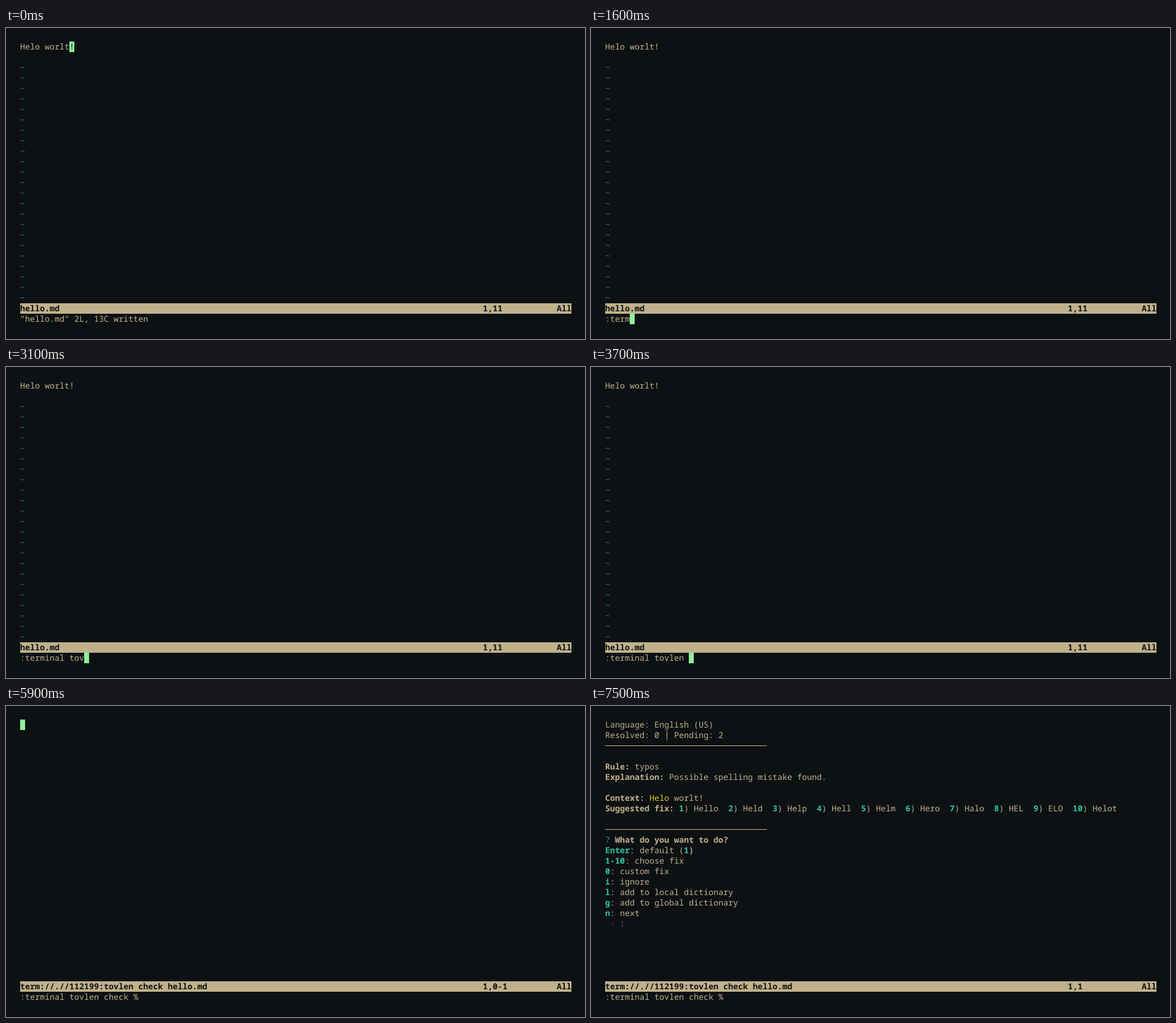
An HTML page for the animation above (8000 ms loop, 941x505 px).

```html
<!DOCTYPE html>
<html lang="en">
<head>
<meta charset="utf-8">
<title>Terminal session</title>
<style>
  html, body { margin: 0; width: 100%; height: 100%; overflow: hidden; background: #0d1113; }
  svg { display: block; width: 941px; height: 505px; }
  text {
    font: 13.3333px "Noto Sans Mono", "DejaVu Sans Mono", monospace;
    font-variant-ligatures: none;
    text-rendering: geometricPrecision;
    white-space: pre;
    fill: #c0b18b;
  }
  .bold { font-weight: 700; }
  .key { font-weight: 700; fill: #2dc5a4; }
  .tilde { fill: #2283b8; }
  .ask { fill: #2a93c4; }
  .typo { fill: #d6c916; }
  .dim { fill: #3b4448; }
  .dark { fill: #0d1113; }
  .bar { font-weight: 700; fill: #0d1113; }
  .dots { letter-spacing: -2px; }
</style>
</head>
<body>
<svg id="stage" viewBox="0 0 941 505"></svg>
<script>
const LOOP = 8000, LEFT = 23, TOP = 22, CELL = 8, LINE = 17;
const FG = '#c0b18b', BG = '#0d1113', CURSOR = '#90f09c';
const STATUS = 25, PROMPT = 26;
const COMMAND = ':terminal tovlen check %';
const CHECKING = 'Checking via https://api.tovlenwords.test/v2/check';

// One time per typed character of COMMAND.
const KEYS = [
  400, 1000, 1300, 1400, 1600, 1700, 1900, 2000, 2200,
  2400, 2600, 2800, 3100, 3200, 3400, 3500, 3700, 3900, 4000,
  4200, 4400, 4600, 4800, 5500
];
const OPEN = 5900, OUTPUT = 6200, BLINK_OFF = 6500, REPORT = 6800, BLINK_ON = 7000, BLINK_END = 7500;

const stage = document.getElementById('stage');
const colX = col => LEFT + col * CELL;
const rowY = row => TOP + row * LINE;

function make(tag, attrs, parent = stage) {
  const el = document.createElementNS('http://www.w3.org/2000/svg', tag);
  for (const name in attrs) el.setAttribute(name, attrs[name]);
  return parent.appendChild(el);
}

const rect = (x, y, width, height, fill, parent) =>
  make('rect', { x, y, width, height, fill }, parent);

function write(row, col, string, style = '', parent = stage) {
  const el = make('text', { x: colX(col), y: rowY(row) + 13, class: style }, parent);
  el.textContent = string;
  return el;
}

// Segments are plain strings or [string, style] pairs.
function writeRow(parent, row, ...segments) {
  let col = 0;
  for (const segment of segments) {
    const [string, style] = [].concat(segment);
    write(row, col, string, style, parent);
    col += string.length;
  }
}

const show = (el, on) => el.setAttribute('visibility', on ? 'visible' : 'hidden');

function buildEditor() {
  const g = make('g', {});
  writeRow(g, 0, 'Helo worlt!');
  for (let row = 2; row < STATUS; row++) write(row, 0, '~', 'tilde', g);
  return g;
}

function buildChecking() {
  const g = make('g', {});
  writeRow(g, 0, CHECKING);
  write(0, CHECKING.length + 0.25, '...', 'dots', g);
  return g;
}

function buildReport() {
  const g = make('g', {});
  const bold = s => [s, 'bold'], key = s => [s, 'key'];
  const fixes = 'Hello Held Help Hell Helm Hero Halo HEL ELO Helot'.split(' ');
  writeRow(g, 0, 'Language: English (US)');
  writeRow(g, 1, 'Resolved: 0   Pending: 2');
  rect(colX(12) + 4, rowY(1), 1, LINE, FG, g);
  for (const row of [2, 10]) rect(LEFT, rowY(row) + 8, 263, 1, FG, g);
  writeRow(g, 4, bold('Rule:'), ' typos');
  writeRow(g, 5, bold('Explanation:'), ' Possible spelling mistake found.');
  writeRow(g, 7, bold('Context:'), ' ', ['Helo', 'typo'], ' worlt!');
  writeRow(g, 8, bold('Suggested fix:'), ' ',
    ...fixes.flatMap((fix, i) => [key(String(i + 1)), `) ${fix}  `]));
  writeRow(g, 11, ['?', 'ask'], bold(' What do you want to do?'));
  writeRow(g, 12, key('Enter'), ': default (', key('1'), bold(')'));
  const options = [
    ['1-10', 'choose fix'], ['0', 'custom fix'], ['i', 'ignore'],
    ['l', 'add to local dictionary'], ['g', 'add to global dictionary'], ['n', 'next']
  ];
  options.forEach(([name, action], i) => writeRow(g, 13 + i, key(name), ': ' + action));
  writeRow(g, 19, [' › 1', 'dim']);
  return g;
}

rect(0, 0, 941, 505, BG);
rect(0, 504, 941, 1, '#000');
const editor = buildEditor(), checking = buildChecking(), report = buildReport();
rect(LEFT, rowY(STATUS), 896, LINE, FG);
const fileName = write(STATUS, 0, '', 'bar');
const ruler = write(STATUS, 94, '', 'bar');
write(STATUS, 109, 'All', 'bar');
const prompt = write(PROMPT, 0, '');
const cursor = make('g', {});
rect(0, 0, CELL, LINE, CURSOR, cursor);
const cursorChar = make('text', { x: 0, y: 13, class: 'dark' }, cursor);

function placeCursor(row, col, char) {
  cursor.setAttribute('transform', `translate(${colX(col)} ${rowY(row)})`);
  cursorChar.textContent = char;
}

function draw(t) {
  const typed = KEYS.filter(time => time <= t).length;
  const inTerm = t >= OPEN;

  show(editor, !inTerm);
  show(checking, t >= OUTPUT && t < REPORT);
  show(report, t >= REPORT);

  fileName.textContent = inTerm ? 'term://.//112199:tovlen check hello.md' : 'hello.md';
  ruler.textContent = !inTerm ? '1,11' : t < OUTPUT ? '1,0-1' : '1,1';
  prompt.textContent = typed ? COMMAND.slice(0, typed) : '"hello.md" 2L, 13C written';

  if (inTerm) placeCursor(0, 0, t < OUTPUT ? '' : t < REPORT ? 'C' : 'L');
  else if (typed) placeCursor(PROMPT, typed, '');
  else placeCursor(0, 10, '!');
  show(cursor, t < BLINK_OFF || (t >= BLINK_ON && t < BLINK_END));
}

const start = performance.now();
function tick() {
  draw((performance.now() - start) % LOOP);
  requestAnimationFrame(tick);
}
tick();
</script>
</body>
</html>
```
